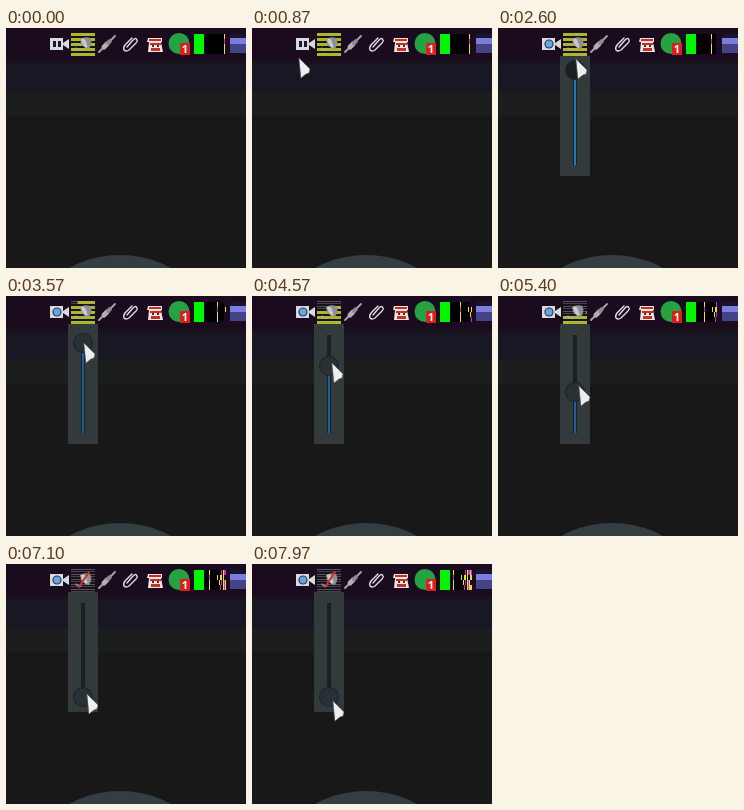
Recreate the animation shown at these times as an HTML page with a canvas. Size 240 px wide and 240 px high, loop 8 s.

```html
<!DOCTYPE html>
<html>
<head>
<meta charset="utf-8">
<style>
html, body { margin: 0; width: 100%; height: 100%; overflow: hidden; background: #181818; }
canvas { display: block; }
</style>
</head>
<body>
<canvas id="stage" width="240" height="240"></canvas>
<script>
const LOOP = 8000;
const KNOB_TOP = 42, KNOB_END = 133;
const g = document.getElementById('stage').getContext('2d');

function rect(x, y, w, h, color) {
  g.fillStyle = color;
  g.fillRect(x, y, w, h);
}

function disc(x, y, r, color) {
  g.fillStyle = color;
  g.beginPath();
  g.arc(x, y, r, 0, 7);
  g.fill();
}

function shape(d, color) {
  g.fillStyle = color;
  g.fill(new Path2D(d));
}

function stroke(d, color, width) {
  g.strokeStyle = color;
  g.lineWidth = width;
  g.lineCap = 'round';
  g.stroke(new Path2D(d));
}

function ease(t, from, to) {
  const u = Math.min(1, Math.max(0, (t - from) / (to - from)));
  return u * u * (3 - 2 * u);
}

function random(seed) {
  const v = Math.sin(seed * 12.9898) * 43758.5453;
  return v - Math.floor(v);
}

// The pointer enters, reaches the volume icon, drops to the knob and drags it down.
function pose(t) {
  const enter = ease(t, 30, 830), reach = ease(t, 870, 1430);
  const drop = ease(t, 2430, 2770), drag = ease(t, 2930, 7900);
  return {
    x: -14 + 61 * enter + 30 * reach + drop + 3 * Math.min(1, drag * 3),
    y: 34 - 4 * enter - 12 * reach + 25 * drop + 94 * drag,
    knob: Math.min(KNOB_END, KNOB_TOP + 109 * drag)
  };
}

function backdrop() {
  rect(0, 0, 240, 240, '#181818');
  rect(0, 0, 240, 33, '#1a0b1e');
  rect(0, 33, 240, 4, '#17141b');
  rect(0, 37, 240, 27, '#1a1725');
  rect(0, 64, 240, 24, '#1b1e1d');
  disc(114, 333.5, 106.5, '#343d42');
}

function camera(ready) {
  rect(44, 10, 13, 12, '#d9dadd');
  shape('M57 15L63 11V21L57 17Z', '#d9dadd');
  if (ready) {
    disc(51, 16, 4.6, '#263e60');
    disc(51, 16, 3.4, '#6ba2e0');
  } else {
    rect(47, 13, 3, 6, '#20152a');
    rect(52, 13, 3, 6, '#20152a');
  }
}

function volume(level) {
  rect(65, 5, 24, 23, '#17131b');
  for (let i = 0; i < 5; i++) {
    const y = 25 - i * 5;
    const w = 24 * Math.min(1, Math.max(0, level * 5 - i));
    rect(65, y, 24, 1, '#55525a');
    rect(65, y + 2, 24, 1, '#45424a');
    rect(89 - w, y, w, 3, '#aeb62b');
  }
  shape('M74 11Q79 8 84 10Q87 15 83 21Q79 21 75 16Z', '#8f9093');
  shape('M75 11Q79 9 80 14Q82 18 81 20Q76 18 75 11Z', '#c9c9cb');
  stroke('M70 20Q72 23 75 22', '#b0b0b2', 1.2);
  if (level <= 0) stroke('M73 23L83 8', '#d52e2b', 2);
}

function plug() {
  stroke('M93 24L97 20M105 12L109 8', '#a7a7a9', 1.8);
  stroke('M98 19L101 16', '#b0b0b1', 5);
  stroke('M102 15L104 13', '#8c8c90', 4);
}

function phone() {
  shape('M142 10H156V14H155L157 24H142L143 14H141Z', '#eee5df');
  rect(143, 11, 12, 2, '#c6302b');
  rect(144, 15, 11, 2, '#c6302b');
  rect(145, 20, 9, 3, '#c6302b');
  rect(146, 17, 2, 2, '#572625');
  rect(151, 17, 2, 2, '#572625');
}

function tray() {
  plug();
  stroke('M121 19L127 12Q130 9 131 12Q132 13 129 16L123 22Q120 24 118 22Q117 20 119 17L126 10', '#dedee0', 1.4);
  phone();
  disc(173, 15.5, 10.5, '#25a343');
  rect(174, 15, 10, 12, '#d9201d');
  g.fillStyle = '#fff';
  g.font = 'bold 11px "Open Sans", sans-serif';
  g.textAlign = 'center';
  g.fillText('1', 179, 25);
}

function graphs(t) {
  rect(188, 6, 10, 20, '#00f500');
  rect(198, 6, 20, 20, '#000');
  const shift = Math.floor(t / 450);
  // One lone spike, then broken columns once the drag begins.
  for (let col = 0; col < shift + 2; col++) {
    const x = 218 + col - shift;
    for (let row = 0; row < 4; row++) {
      const pick = random(col * 4 + row + 1);
      const lit = col === 0 || (col > 7 && pick < 0.4);
      if (lit && x >= 198) rect(x, 6 + row * 5, 1, 5, pick < 0.15 ? '#d020d0' : '#e8e030');
    }
  }
  rect(224, 6, 16, 19, '#17152f');
  rect(224, 10, 16, 6, '#7d7ddd');
  rect(224, 16, 16, 9, '#444386');
}

function slider(t, y) {
  const grabbed = t > 2930;
  rect(62, 28, 30, 120, '#323a3c');
  rect(75, 39, 4, 98, '#1c2022');
  if (y < KNOB_END) rect(76, y, 2, 137 - y, grabbed ? '#205f9f' : '#2675c4');
  disc(77, y, 10, '#1d2428');
  disc(77, y, 9, grabbed ? '#273136' : '#1b1e20');
}

function pointer(x, y) {
  g.save();
  g.translate(Math.round(x), Math.round(y));
  const arrow = 'M0 0L11 11L10 15L7 16L2 20Z';
  shape(arrow, '#eee');
  stroke(arrow, '#55585a', 0.6);
  g.restore();
}

function draw(t) {
  const { x, y, knob } = pose(t);
  backdrop();
  camera(t >= 1600);
  volume((KNOB_END - knob) / (KNOB_END - KNOB_TOP));
  tray();
  graphs(t);
  if (t >= 1630) slider(t, knob);
  pointer(x, y);
}

const start = performance.now();
function tick() {
  draw((performance.now() - start) % LOOP);
  requestAnimationFrame(tick);
}
tick();
</script>
</body>
</html>
```
